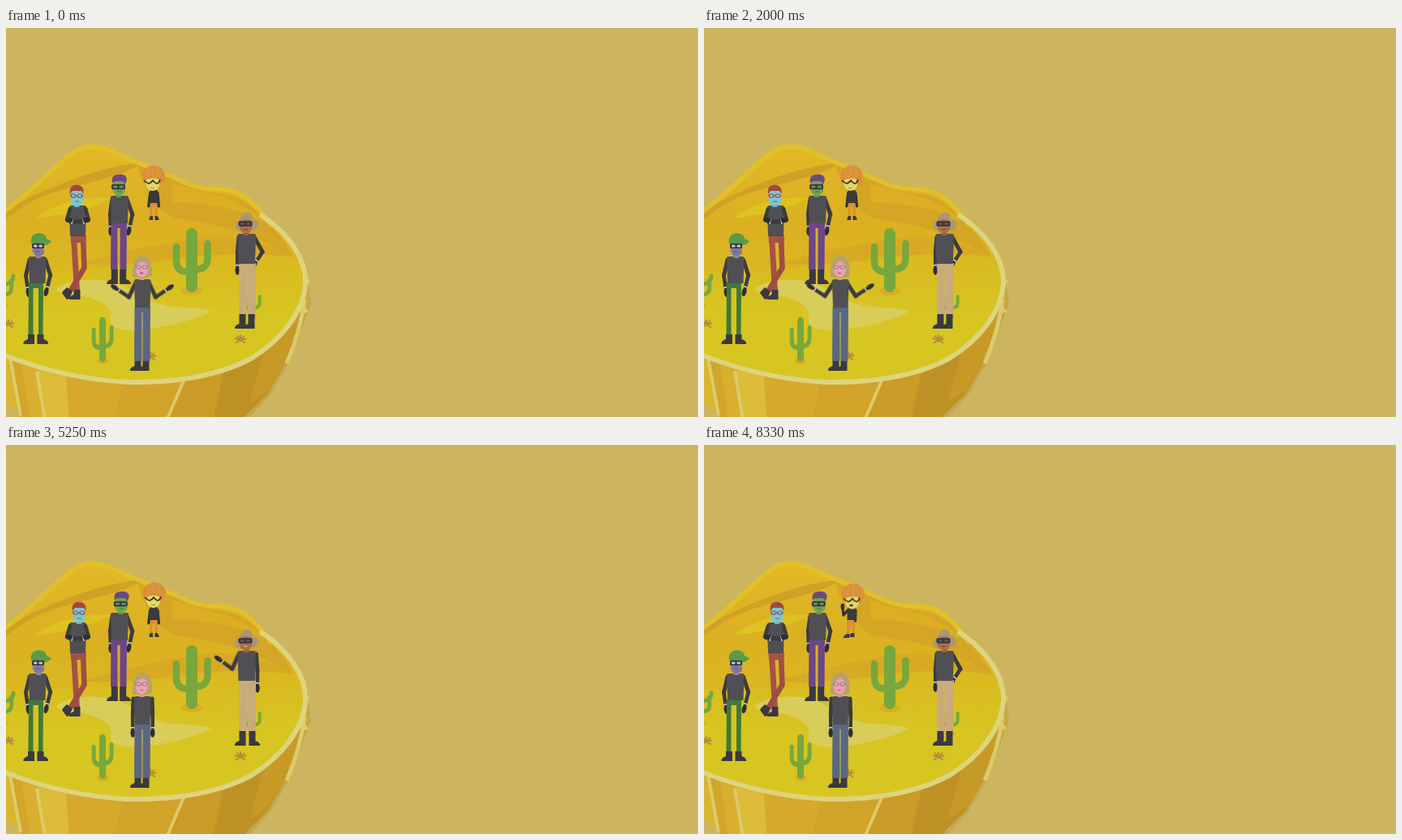
An HTML page for the animation above (8410 ms loop, 853 px wide and 480 px high).

```html
<!DOCTYPE html>
<html lang="en">
<head>
<meta charset="utf-8">
<title>Desert island crew</title>
<style>
  html, body { margin: 0; width: 100%; height: 100%; overflow: hidden; background: #cdb55f; }
  svg { display: block; width: 100%; height: 100%; }

  /* Three takes: 0-2670, 2670-5500 and 5500-8410 ms */
  .s1, .s2, .s3, .s13, .s23, .s12, .look, .kid { animation: 8.41s step-end infinite; }
  .s1 { animation-name: s1; }
  .s2 { animation-name: s2; }
  .s3 { animation-name: s3; }
  .s12 { animation-name: s12; }
  .s13 { animation-name: s13; }
  .s23 { animation-name: s23; }
  .look { animation-name: look; }
  .kid { animation-name: kid; }
  @keyframes s1 { 0% { visibility: visible } 31.75%, 100% { visibility: hidden } }
  @keyframes s2 { 0% { visibility: hidden } 31.75% { visibility: visible } 65.4%, 100% { visibility: hidden } }
  @keyframes s3 { 0% { visibility: hidden } 65.4%, 100% { visibility: visible } }
  @keyframes s12 { 0% { visibility: visible } 65.4%, 100% { visibility: hidden } }
  @keyframes s13 { 0% { visibility: visible } 31.75% { visibility: hidden } 65.4%, 100% { visibility: visible } }
  @keyframes s23 { 0% { visibility: hidden } 31.75%, 100% { visibility: visible } }
  @keyframes look { 0% { transform: none } 31.75%, 100% { transform: translateX(2.8px) } }
  @keyframes kid { 0% { transform: none } 31.75% { transform: translateX(1px) } 65.4%, 100% { transform: translate(2px, 1.5px) } }

  .shrugU { animation: shrugU 8.41s ease-in-out infinite; }
  .shrugF { animation: shrugF 8.41s ease-in-out infinite; }
  @keyframes shrugU {
    0%, 7.5%, 18% { transform: rotate(25deg) }
    3.5%, 12.8%, 23.8%, 100% { transform: rotate(33deg) }
  }
  @keyframes shrugF {
    0%, 7.5%, 18% { transform: rotate(99deg) }
    3.5%, 12.8%, 23.8%, 100% { transform: rotate(90deg) }
  }
  .waveU { animation: waveU 8.41s ease-in-out infinite; }
  .waveF { animation: waveF 8.41s ease-in-out infinite; }
  @keyframes waveU { 0%, 39.5% { transform: rotate(4deg) } 44.5%, 100% { transform: rotate(24deg) } }
  @keyframes waveF {
    0%, 39.5% { transform: rotate(-4deg) }
    44.5%, 53%, 61%, 100% { transform: rotate(102deg) }
    49%, 57% { transform: rotate(95deg) }
  }
  .talk { transform-box: fill-box; transform-origin: center; animation: talk .4205s ease-in-out infinite; }
  @keyframes talk { 0%, 100% { transform: scaleY(.9) } 45% { transform: scaleY(.25) } 70% { transform: scaleY(.6) } }
</style>
</head>
<body>
<svg id="stage" viewBox="0 0 853 480" preserveAspectRatio="none"></svg>
<script>
const SHIRT = '#504f53', SLEEVE = '#3c3b40', GLOVE = '#302d36', BOOT = '#3b3840';

const path = (d, fill, extra = '') => `<path d="${d}" fill="${fill}" ${extra}/>`;
const line = (d, color, width, extra = '') =>
  `<path d="${d}" fill="none" stroke="${color}" stroke-width="${width}" stroke-linejoin="round" ${extra}/>`;
const round = (d, color, width) => line(d, color, width, 'stroke-linecap="round"');
const oval = (x, y, rx, ry, fill, extra = '') =>
  `<ellipse cx="${x}" cy="${y}" rx="${rx}" ry="${ry}" fill="${fill}" ${extra}/>`;
const box = (x, y, w, h, fill, r = 0) =>
  `<rect x="${x}" y="${y}" width="${w}" height="${h}" rx="${r}" fill="${fill}"/>`;
const group = (cls, ...parts) => `<g class="${cls}">${parts.join('')}</g>`;
const at = (transform, ...parts) => `<g transform="${transform}">${parts.join('')}</g>`;

// An arm hanging from a shoulder; angles turn the upper arm and the elbow.
function arm(x, y, shoulder, elbow, { upper = 20, fore = 20, name = '' } = {}) {
  const tag = part => name ? `class="${name}${part}"` : '';
  return at(`translate(${x} ${y})`,
    `<g transform="rotate(${shoulder})" ${tag('U')}>`,
    round(`M0 0V${upper}`, SLEEVE, 5),
    `<g transform="translate(0 ${upper})"><g transform="rotate(${elbow})" ${tag('F')}>`,
    round(`M0 0V${fore - 5}`, SLEEVE, 4.6),
    box(-2.4, fore - 6, 4.8, 1.6, '#d8d4c4'),
    oval(0, fore + 1.2, 2.8, 5.6, GLOVE),
    '</g></g></g>');
}

const boot = (x, y, h, dir) => at(`translate(${x} ${y}) scale(${dir} 1)`,
  path(`M-4 0H4V${h}H-9.500V${h - 2}Q-8 ${h - 5} -4 ${h - 6}Z`, BOOT));

const torso = (x, y, w, h) =>
  path(`M${x + 2} ${y}H${x + w - 2}Q${x + w} ${y} ${x + w} ${y + 3}L${x + w - 1} ${y + h}H${x + 1}L${x} ${y + 3}Q${x} ${y} ${x + 2} ${y}Z`, SHIRT);

// Trousers with a straight gap between two legs of width leg.
const legs = (x, y, w, h, color, leg) =>
  path(`M${x} ${y}H${x + w}L${x + w - .5} ${y + h}H${x + w - leg - .5}V${y + 7}H${x + leg}V${y + h}H${x - .5}Z`, color);

const goggles = (x, y, w, lens = '#625d66') =>
  box(x - w / 2, y - 3.2, w, 6.4, '#37343c', 2) +
  box(x - w / 2 + 2, y - 1.4, w / 2 - 3, 2.8, lens, 1.2) + box(x + 1, y - 1.4, w / 2 - 3, 2.8, lens, 1.2);

const glasses = (x, y, color) =>
  [-4, 4].map(dx => oval(x + dx, y, 3, 2, 'none', `stroke="${color}" stroke-width="1.1"`)).join('') +
  line(`M${x - 8} ${y - 1}H${x - 7}M${x - 1} ${y}H${x + 1}M${x + 7} ${y}H${x + 8}`, color, 1.1);

function cactus(x, y, sx, sy) {
  return at(`translate(${x} ${y}) scale(${sx} ${sy})`,
    oval(0, -2, 13, 6, '#d9ad24'),
    round('M0 -7V-72', '#78a73b', 14),
    round('M-19 -56V-38Q-19 -25 -4 -25H0M19.500 -60V-42Q19.500 -28 4 -28H0', '#78a73b', 8.5));
}

const twig = (x, y) => line(
  [-160, -125, -90, -50, -15, 35, 145].map(a => {
    const r = a * Math.PI / 180;
    return `M${x} ${y}l${(7.5 * Math.cos(r)).toFixed(1)} ${(6.5 * Math.sin(r)).toFixed(1)}`;
  }).join(''), '#b88b32', 2);

const ridge = 'M-5 225C25 205 54 172 78 154C96 140 115 141 135 151C165 165 198 177 228 191C245 198 258 194 278 198C300 204 316 224 330 243';
const dunes = ridge + 'C345 258 353 272 354 283C305 276 265 279 200 287C130 294 70 304 -5 302Z';
const shore = 'C348 253 371 285 369 317C366 350 342 383 302 408C258 431 205 438 150 437C95 434 45 423 -6 402';

function island() {
  return `<defs>
    <linearGradient id="sand" x1="0" y1="220" x2="0" y2="350" gradientUnits="userSpaceOnUse">
      <stop stop-color="#dbb222"/><stop offset=".45" stop-color="#dab820"/><stop offset="1" stop-color="#d7c522"/>
    </linearGradient>
    <linearGradient id="slope" x1="0" y1="142" x2="0" y2="300" gradientUnits="userSpaceOnUse">
      <stop stop-color="#e1b926"/><stop offset=".6" stop-color="#dbb022"/><stop offset="1" stop-color="#dab720"/>
    </linearGradient>
    <clipPath id="hill"><path d="${dunes}"/></clipPath>
    <filter id="soft"><feGaussianBlur stdDeviation=".6"/></filter>
  </defs>` + `<g filter="url(#soft)">` + [
    line('M370 312L374 340L346 414L323 453L288 490', '#b69a48', 4, 'opacity=".5"'),
    path('M-5 390V457L17 474L22 490H284L322 452L345 412L372 345L370 312Z', '#d6a92a'),
    path('M-5 400L5 408L17 475L-5 458Z', '#dbb530'),
    path('M5 406L38 420L48 490H22Z', '#d2a62b'),
    path('M20 416L38 422L48 490H31Z', '#d8af2e'),
    path('M38 422L74 430L78 490H48Z', '#dcbc3a'),
    path('M143 436L218 434L198 490H133Z', '#d2a329'),
    path('M218 434L270 422L256 490H198Z', '#ca9b26'),
    path('M268 424L372 343L345 412L322 452L284 490H254Z', '#be9125'),
    path('M318 398L370 345L345 412L322 448L300 462Z', '#c79a27'),
    line('M5 407L18 478M38 424L48 484M219 435L198 484', '#dccb69', 4),
    line('M368 335Q363 374 346 414', '#dccb69', 5),
    path('M370 307L375 312L371 318ZM368 342L373 350L366 353Z', '#dccb69'),
    path('M-6 230L313 230' + shore + 'Z', 'url(#sand)'),
    path(dunes, 'url(#slope)'),
    '<g clip-path="url(#hill)">',
    path('M-5 228C35 204 105 172 168 166C140 188 75 192 34 213C18 221 8 231 -5 239Z', '#cfa126'),
    path('M160 164C198 183 234 202 268 205C304 210 333 248 356 284C314 260 270 241 208 235Q175 220 160 164Z', '#d5a625'),
    path('M205 192C246 205 288 206 318 240C288 222 248 216 205 215Z', '#dcae23'),
    path('M36 235C58 216 97 207 130 210C108 222 74 231 36 235Z', '#dcc320'),
    path('M92 291C150 274 205 262 262 256C308 260 334 272 356 284C305 276 252 278 200 286C155 292 120 294 92 291Z', '#d8aa23'),
    line(ridge, '#e2c02a', 11),
    '</g>',
    line('M313 230' + shore, '#ddd47e', 6),
    path('M62 322C78 310 108 307 136 315C160 323 178 342 207 344C226 345 246 346 253 350C236 359 207 367 174 372C150 375 126 372 129 358C132 344 116 335 91 330C76 328 64 328 62 322Z', '#d8cd58'),
    cactus(229, 326, 1, 1), cactus(119, 412, .57, .7), cactus(-4, 344, .55, .55), cactus(304, 358, .45, .45),
    round('M0 316Q9 314 9 306', '#78a73b', 5),
    twig(289, 385), twig(3, 366), twig(178, 406),
  ].join('') + '</g>';
}

function kid() {
  const color = '#d9922f';
  return group('s12',
      legs(177.500, 214, 9.500, 19, color, 3),
      path('M176.500 237V235L178 232H181V237ZM183.500 237V232H186.500L188.500 235V237Z', BOOT),
      round('M177.500 204L175.800 220M187 204L188.400 220', '#343238', 3.2)) +
    group('s3',
      path('M176 214H187L185.500 233H182.500L182 221L179 234H176Z', color),
      path('M172 238V236L176 233H179V238ZM179.500 237V234L182 232H185.500V237Z', BOOT),
      round('M177 204L172 210L171 200M187 204L186.500 217', '#343238', 3.2),
      oval(170.800, 199.500, 2.300, 4, GLOVE)) +
    path('M178 200H186L188 203L187.500 216H176.500V203Z', '#3c393d') +
    group('kid',
      oval(182, 183, 14, 13.500, '#da903a'),
      oval(180.700, 192, 8.500, 9, '#e3d967'),
      path('M170 188Q171 174 182 174Q193 175 193 188Q182 183 170 188Z', '#da903a'),
      line('M174 184L176 174M181 183V172M188 184L187 174', '#e5a34c', .8),
      line('M170 188Q173 191 176 192Q180 190 181 188Q183 191 186 192Q189 191 190 187', '#393230', 1.7),
      group('s12', line('M178 197Q181 198.500 183 197', '#9d7d3d', .9)),
      group('s3', oval(179.500, 196.500, 2.500, 2, '#57352b', 'class="talk"')));
}

function purpleMan() {
  return arm(131, 211, 8, -10, { upper: 19 }) + arm(149, 211, -20, 32) +
    legs(129.500, 240, 19.500, 58, '#6c4788', 8) + boot(133.800, 298, 18, 1) + boot(144.200, 298, 18, -1) +
    torso(129, 207, 22, 34) +
    group('look',
      box(136, 201, 6, 8, '#659a4d'), box(131.500, 185, 15.500, 21, '#6fa653', 6),
      path('M131 191Q129 182 137 181Q148 179 149 187L147 193L144 189H135Z', '#6b4a80'),
      goggles(138.500, 196, 17, '#6f8a60'), line('M137 202H142', '#426d35', 1));
}

function blueMan() {
  return line('M83.500 258L87.500 324', '#a65146', 7) +
    line('M95 258L96.500 296L79.500 324', '#9f4c42', 6.5) +
    path('M79.500 256H99L98.500 265H80Z', '#a65146') +
    path('M75 320L82 325L78 334L75 335L69 327L70 325Z', BOOT) + boot(87.500, 323, 12, 1) +
    torso(78, 219, 21, 38) +
    round('M79 223L75 237L96 240M98 223L102 237L80 240', SLEEVE, 4.6) +
    line('M82 236L81 242M95 236L96 242', '#d8d4c4', 1.5) + oval(78, 237, 4, 3.200, GLOVE) + oval(99, 237, 4, 3.200, GLOVE) +
    group('look',
      box(84, 213, 6.500, 8, '#6bb4c8'), box(79.500, 196, 15.500, 23, '#7bc6d5', 6),
      path('M79 205Q77 194 87 193.500Q97 194 95.500 205L93 201H82Z', '#a0483f'),
      glasses(87, 207, '#a0483f'), line('M85 214H90', '#b65154', 1.2));
}

function greenMan() {
  return arm(29, 286, 13, -21) + arm(48.500, 286, -18, 32) +
    legs(28, 314, 18, 65, '#3f7a36', 5.5) + boot(31, 378, 12, 1) + boot(42.500, 378, 12, -1) +
    torso(28, 282, 21.500, 33) + box(37, 276, 6, 8, '#8e84a5') +
    box(32.500, 261, 14.500, 20, '#9d94b8', 6) +
    path('M31 266Q29 255 40 253Q49 253 50 260L56 263Q52 269 46 268L44 265Q38 267 31 266Z', '#5b9a48') +
    goggles(39.500, 269, 15, '#c3c5d4') +
    path('M32.500 274Q40 271 47 274V278Q43 283 36 281Z', '#81799a') + line('M37 276H42', '#5f5876', 1);
}

function woman() {
  const raised = arm(160, 314, 25, 99, { name: 'shrug' });
  return group('s1', raised, at('translate(336 0) scale(-1 1)', raised)) +
    group('s23', arm(157, 313, 2, -2, { fore: 21 }), arm(180, 313, -2, 2, { fore: 21 })) +
    legs(158.500, 344, 19.500, 67, '#5b6781', 9) + boot(172.500, 411, 12, 1) + boot(162.500, 411, 12, 1) +
    torso(158, 310, 20.500, 35) +
    path('M156 307Q155 281 168 281Q181 281 180 306L174 308H160Z', '#b4a270') +
    box(164.500, 303, 6, 8, '#dc929b') + oval(167.300, 297.500, 7.600, 10, '#eca2ad') +
    path('M159 296Q158 285 169 284Q177 286 176 296Q174 289 168 288Q162 290 159 296Z', '#b4a270') +
    glasses(167, 295, '#a97d98') +
    group('s1', oval(167, 302.500, 2.300, 1.500, '#b0607a', 'class="talk"')) +
    group('s23', line('M165 302.500H169', '#b8657a', 1));
}

function tanMan() {
  return group('s13',
      arm(287, 258, 5, -5), arm(306, 258, -29, 62, { upper: 21, fore: 18 }),
      boot(302.500, 353, 18, 1)) +
    group('s2',
      arm(287, 258, 4, -4, { name: 'wave' }), arm(308.500, 258, -4, 4, { upper: 21 }),
      boot(303.500, 353, 18, -1)) +
    legs(287.500, 290, 20.500, 63, '#c8ac78', 9.5) + boot(291.500, 353, 18, 1) +
    torso(285.500, 254, 22.500, 37) +
    oval(287.500, 244, 4.800, 6, '#a89776') + oval(306, 243, 5, 6.500, '#a89776') +
    oval(297, 232, 6, 4.500, '#a89776') +
    box(293, 248, 6.500, 8, '#9a6244') + box(288, 232, 15.500, 21, '#ac6f4d', 6.500) +
    path('M288 239Q288 230 296 231Q304 230 304 239Q296 233 288 239Z', '#a89776') +
    goggles(295, 241.500, 17, '#5f5252') +
    group('s13', line('M293 248.500H298', '#70432f', 1)) +
    group('s2', oval(295.500, 248.500, 3, 1.900, '#e4c6ba', 'class="talk"'));
}

document.getElementById('stage').innerHTML = box(0, 0, 853, 480, '#cdb55f') +
  [island, kid, purpleMan, blueMan, greenMan, woman, tanMan].map(draw => draw()).join('');
</script>
</body>
</html>
```
